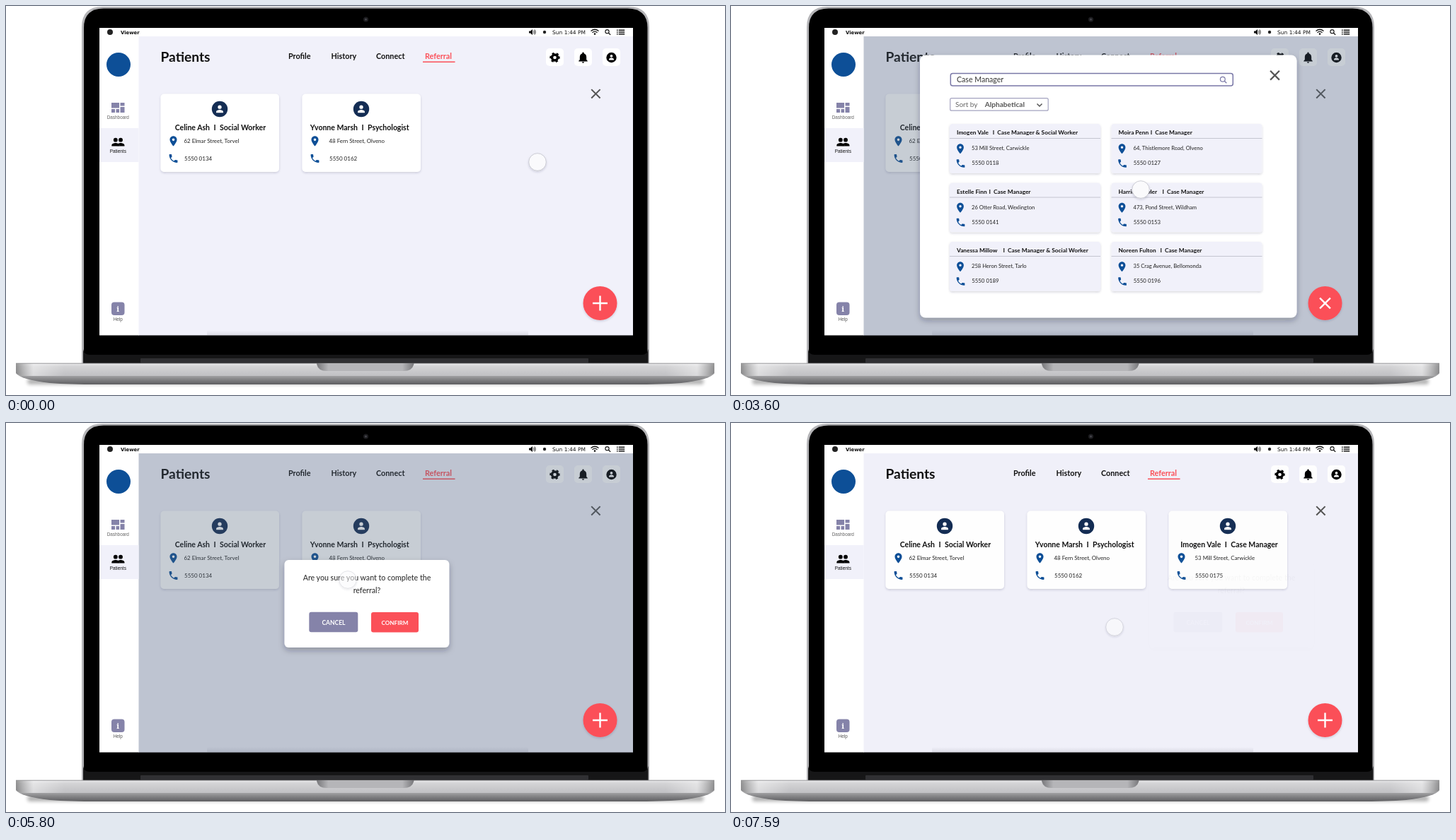
Animation, 1016 px wide and 551 px high, one loop 8.29 s. Source, as an HTML page:

```html
<!DOCTYPE html>
<html lang="en">
<head>
<meta charset="utf-8">
<title>Patient referral</title>
<style>
  html, body { margin: 0; width: 100%; height: 100%; overflow: hidden; background: #fff; }
  svg { display: block; width: 1016px; height: 551px; }
  text { font-family: Lato, "Open Sans", sans-serif; }
  .ui { font-family: "Liberation Sans", Arial, sans-serif; }
  .bar { font-family: "DejaVu Sans", Verdana, sans-serif; }
</style>
</head>
<body>
<svg id="stage" viewBox="0 0 1016 551"></svg>
<script>
const RED = '#fb5058', BLUE = '#0d4f97', NAVY = '#142d54', PURPLE = '#8583a9', PALE = '#f1f1fa';
const LOOP = 8290, STEP = 100;

const ICONS = {
  pin: 'M12 2C8.13 2 5 5.13 5 9c0 5.25 7 13 7 13s7-7.75 7-13c0-3.87-3.13-7-7-7zm0 9.5a2.5 2.5 0 0 1 0-5 2.5 2.5 0 0 1 0 5z',
  phone: 'M6.62 10.79c1.44 2.83 3.76 5.14 6.59 6.59l2.2-2.2c.27-.27.67-.36 1.02-.24 1.12.37 2.33.57 3.57.57.55 0 1 .45 1 1V20c0 .55-.45 1-1 1-9.39 0-17-7.61-17-17 0-.55.45-1 1-1h3.5c.55 0 1 .45 1 1 0 1.25.2 2.45.57 3.57.11.35.03.74-.25 1.02z',
  bell: 'M12 22c1.1 0 2-.9 2-2h-4c0 1.1.9 2 2 2zm6-6v-5c0-3.07-1.64-5.64-4.5-6.32V4c0-.83-.67-1.5-1.5-1.5s-1.5.67-1.5 1.5v.68C7.63 5.36 6 7.92 6 11v5l-2 2v1h16v-1z'
};

const rect = (x, y, w, h, fill, r = 0, more = '') =>
  `<rect x="${x}" y="${y}" width="${w}" height="${h}" rx="${r}" fill="${fill}" ${more}/>`;
const circle = (x, y, r, fill, more = '') => `<circle cx="${x}" cy="${y}" r="${r}" fill="${fill}" ${more}/>`;
const line = (d, color, width, more = '') =>
  `<path d="${d}" fill="none" stroke="${color}" stroke-width="${width}" ${more}/>`;
const text = (s, x, y, size, o = {}) =>
  `<text x="${x}" y="${y}" font-size="${size}" font-weight="${o.w || 400}" fill="${o.fill || '#111'}" ` +
  `text-anchor="${o.at || 'start'}" class="${o.c || ''}">${s.replace('&', '&amp;')}</text>`;
const icon = (name, x, y, scale, fill = BLUE) =>
  `<path d="${ICONS[name]}" fill="${fill}" transform="translate(${x} ${y}) scale(${scale}) translate(-12 -12)"/>`;
const cross = (x, y, r, color, width) =>
  line(`M${x - r} ${y - r}l${2 * r} ${2 * r}m0 ${-2 * r}l${-2 * r} ${2 * r}`, color, width);
const person = (x, y, s, fill) =>
  `<path transform="translate(${x} ${y}) scale(${s})" fill="${fill}" d="M0-6a2.8 2.8 0 0 1 0 5.6a2.8 2.8 0 0 1 0-5.6zM-5.2 5.2V4C-5.2 1.8-1.8.9 0 .9S5.2 1.8 5.2 4v1.2z"/>`;
const group = (id, body, more = '') => `<g id="${id}" ${more}>${body}</g>`;

function patientCard(x, sep, addrX, name, role, addr, phone) {
  return rect(x, 124.5, 167.5, 110.5, '#fff', 5, 'filter="url(#soft)"') +
    circle(x + 83.5, 146, 11.2, NAVY) + person(x + 83.5, 146.2, .95, '#fff') +
    text(name, sep - 7, 175.5, 10.5, {w: 700, at: 'end'}) +
    text('I', sep, 175.5, 10.5, {w: 700, at: 'middle'}) +
    text(role, sep + 7, 175.5, 10.5, {w: 700}) +
    icon('pin', x + 18, 191.5, .72) + text(addr, addrX, 194.2, 7.9, {fill: '#222'}) +
    icon('phone', x + 18, 216, .66) + text(phone, addrX + .5, 219.2, 8, {fill: '#222'});
}

function resultCard(x, y, sep, name, role, addr, phone) {
  return rect(x, y, 213, 70, PALE, 4, 'filter="url(#soft)"') +
    line(`M${x} ${y + 20.5}h213`, '#c4c5d0', 1) +
    text(name, x + 10, y + 15, 8.3, {w: 700}) +
    text('I', sep, y + 15, 8.3, {w: 700, at: 'middle'}) +
    text(role, sep + 5.3, y + 15, 8.3, {w: 700}) +
    icon('pin', x + 15, y + 35.3, .7) + text(addr, x + 31, y + 37.4, 7.6, {fill: '#222'}) +
    icon('phone', x + 15.5, y + 56, .65) + text(phone, x + 31.3, y + 58, 7.8, {fill: '#222'});
}

const defs = `<defs>
  <linearGradient id="metal" x2="0" y2="1"><stop offset="0" stop-color="#e9e9ea"/><stop offset=".25" stop-color="#d3d3d5"/><stop offset="1" stop-color="#c0c0c3"/></linearGradient>
  <linearGradient id="under" x2="0" y2="1"><stop offset="0" stop-color="#b9b9bb"/><stop offset=".5" stop-color="#89898b"/><stop offset="1" stop-color="#5e5e61"/></linearGradient>
  <linearGradient id="ends"><stop offset="0" stop-color="#555" stop-opacity=".55"/><stop offset=".025" stop-color="#fff" stop-opacity=".4"/><stop offset=".07" stop-color="#fff" stop-opacity="0"/><stop offset=".93" stop-color="#fff" stop-opacity="0"/><stop offset=".975" stop-color="#fff" stop-opacity=".4"/><stop offset="1" stop-color="#555" stop-opacity=".55"/></linearGradient>
  <linearGradient id="notch"><stop offset="0" stop-color="#77777a"/><stop offset=".12" stop-color="#b5b5b8"/><stop offset=".88" stop-color="#b5b5b8"/><stop offset="1" stop-color="#77777a"/></linearGradient>
  <linearGradient id="dock" x2="0" y2="1"><stop offset="0" stop-color="#667" stop-opacity="0"/><stop offset="1" stop-color="#667" stop-opacity=".16"/></linearGradient>
  <filter id="soft" x="-20%" y="-20%" width="140%" height="150%"><feDropShadow dx="0" dy="1.5" stdDeviation="1.8" flood-color="#334" flood-opacity=".18"/></filter>
  <filter id="deep" x="-20%" y="-20%" width="140%" height="150%"><feDropShadow dx="0" dy="4" stdDeviation="4.5" flood-color="#223" flood-opacity=".3"/></filter>
  <filter id="blur" x="-10%" y="-300%" width="120%" height="700%"><feGaussianBlur stdDeviation="2.5"/></filter>
  <clipPath id="screen"><rect x="132" y="31" width="754" height="435.5"/></clipPath>
</defs>`;

const laptop =
  rect(30, 528, 956, 8, '#000', 4, 'opacity=".3" filter="url(#blur)"') +
  `<path d="M107 508V30Q107 1 136 1H880Q909 1 909 30V508z" fill="#b4b4b7"/>` +
  `<path d="M110 508V31Q110 3.5 138 3.5H878Q906.5 3.5 906.5 31V508z" fill="#000"/>` +
  `<path d="M109 440V486Q110 494 118 494H899Q906 494 907.5 486V440V506H109z" fill="#161617"/>` +
  rect(190, 499, 633, 6.5, '#303033', 1) +
  circle(508.5, 19, 3.6, '#1d1d20') + circle(508.5, 19, 1.6, '#44444a') +
  `<path d="M14 520Q20 529 62 534Q90 536 130 536H886Q926 536 954 534Q996 529 1001 520z" fill="url(#under)"/>` +
  `<path d="M14 506H1001V520Q998 524 985 524H30Q17 524 14 520z" fill="url(#metal)"/>` +
  `<path d="M14 506H1001V520Q998 524 985 524H30Q17 524 14 520z" fill="url(#ends)"/>` +
  line('M14 506.2H1001', '#8d8d90', .9) +
  `<path d="M439 506H576.500Q575 517 562 517H453Q440 517 439 506z" fill="url(#notch)"/>`;

const menuBar = rect(132, 31, 754, 12, '#fff') +
  circle(147, 37, 4, '#222') +
  text('Viewer', 162, 39.8, 6.9, {w: 700, c: 'bar'}) +
  text('Sun 1:44 PM', 772, 39.8, 7.5, {c: 'bar'}) +
  `<path d="M739 35.500h2l3-2.500v8l-3-2.500h-2z" fill="#111"/>` +
  line('M745.5 35q1.500 2 0 4m1.500-5.500q2.500 3.500 0 7', '#111', .9) +
  circle(761, 37, 2.2, '#222') +
  line('M826.500 35.500q5.500-4.500 11 0m-9 2.200q3.500-3 7 0', '#111', 1.3) + circle(832, 39.6, 1.3, '#111') +
  circle(849.5, 36.2, 2.6, 'none', 'stroke="#111" stroke-width="1.1"') + line('M851.500 38.200l2.700 2.700', '#111', 1.3) +
  line('M863 34.200h1.500m1.200 0h8.500m-11.200 2.800h1.500m1.200 0h8.500m-11.200 2.800h1.500m1.200 0h8.500', '#111', 1.5);

const sidebar = rect(132, 43, 55.5, 424, '#fff') + rect(132, 173, 55.5, 48, PALE) +
  circle(159, 83, 17, BLUE) +
  rect(149, 137, 11, 7.5, PURPLE) + rect(149, 146, 5, 5, PURPLE) + rect(155.5, 146, 4.5, 5, PURPLE) +
  rect(161.5, 137, 6, 4.5, PURPLE) + rect(161.5, 143, 6, 8, PURPLE) +
  text('Dashboard', 158.3, 160, 6.4, {at: 'middle', fill: '#666', c: 'ui'}) +
  person(162, 193, 1.05, '#000') + person(154.5, 193, 1.1, PALE) + person(154.8, 193, 1.05, '#000') +
  text('Patients', 158.3, 207.5, 6.4, {at: 'middle', c: 'ui'}) +
  rect(149, 419.5, 18.5, 18.5, PURPLE, 4) +
  `<text x="158.300" y="432.500" font-size="11" font-weight="700" fill="#fff" text-anchor="middle" style="font-family:'Noto Serif',serif">i</text>` +
  text('Help', 158.3, 446, 6.4, {at: 'middle', fill: '#555', c: 'ui'});

const tabs = [['Profile', 399], ['History', 459.5], ['Connect', 523], ['Referral', 592]]
  .map(([s, x]) => text(s, x, 75, 10.8, {w: 700, fill: s === 'Referral' ? RED : '#111'})).join('');

const topIcons = [763, 803, 843].map(x => rect(x, 60, 25, 25, '#fff', 5)).join('') +
  circle(775.5, 73, 4, 'none', 'stroke="#000" stroke-width="3.400"') +
  circle(775.5, 73, 5.9, 'none', 'stroke="#000" stroke-width="2.600" stroke-dasharray="3.100 3.080" transform="rotate(-15 775.5 73)"') +
  icon('bell', 815.5, 73, .78, '#000') +
  circle(855.5, 73, 7.2, '#000') + person(855.5, 73, .68, '#fff');

const page = rect(187, 43, 699, 424, PALE) +
  text('Patients', 218.5, 78.5, 19.2, {w: 700}) + tabs + rect(589, 78.5, 45.5, 1.5, RED) + topIcons +
  cross(833.4, 124.3, 6.2, '#555', 2) + rect(284, 459, 454, 8, 'url(#dock)', 2) +
  patientCard(218.5, 295, 251.5, 'Celine Ash', 'Social Worker', '62 Elmar Street, Torvel', '5550 0134') +
  patientCard(418.5, 504, 456.5, 'Yvonne Marsh', 'Psychologist', '48 Fern Street, Olveno', '5550 0162') +
  group('newCard', patientCard(618.5, 699.3, 655.5, 'Imogen Vale', 'Case Manager', '53 Mill Street, Carwickle', '5550 0175'));

const CM = 'Case Manager', BOTH = 'Case Manager & Social Worker';
const results = [
  [309, 167, 371, 'Imogen Vale', BOTH, '53 Mill Street, Carwickle', '5550 0118'],
  [537.5, 167, 594, 'Moira Penn', CM, '64, Thistlemore Road, Olveno', '5550 0127'],
  [309, 250.5, 365.7, 'Estelle Finn', CM, '26 Otter Road, Wexlington', '5550 0141'],
  [537.5, 250.5, 610.7, 'Harriet Bowler', CM, '473, Pond Street, Wildham', '5550 0153'],
  [309, 334, 385.7, 'Vanessa Millow', BOTH, '258 Heron Street, Tarlo', '5550 0189'],
  [537.5, 334, 607.7, 'Noreen Fulton', CM, '35 Crag Avenue, Bellomonda', '5550 0196']
];

const modal = rect(267, 69.5, 532.5, 372, '#fff', 8, 'filter="url(#deep)"') +
  rect(310.3, 95.5, 399, 17.5, '#fff', 3, 'stroke="#7977a6" stroke-width="1.500"') +
  text(CM, 319, 108, 10.6, {fill: '#333'}) +
  circle(694.8, 103.8, 3.4, 'none', 'stroke="#7977a6" stroke-width="1.200"') + line('M697.300 106.300l3 3', '#7977a6', 1.3) +
  rect(309.7, 130.7, 138.5, 17.5, '#fff', 2, 'stroke="#a3a2bf" stroke-width="1.200"') +
  text('Sort by', 317, 143, 10, {fill: '#666'}) +
  text('Alphabetical', 358.8, 143, 10.1, {w: 700, fill: '#555'}) +
  line('M432.500 138.500l3.500 3.500l3.500-3.500', '#555', 1.5) +
  cross(768.5, 98.2, 6.4, '#555', 2.2) +
  results.map(r => resultCard(...r)).join('');

const dialog = rect(393.5, 194, 232.8, 124, '#fff', 6, 'filter="url(#deep)"') +
  text('Are you sure you want to complete the', 510, 222.5, 10.6, {w: 500, at: 'middle', fill: '#333'}) +
  text('referral?', 510, 240.5, 10.6, {w: 500, at: 'middle', fill: '#333'}) +
  rect(428.3, 267.7, 69, 28.5, PURPLE, 3) + rect(516, 268, 67, 28.5, RED, 3) +
  text('CANCEL', 463, 285.8, 8.5, {w: 700, at: 'middle', fill: '#fff'}) +
  text('CONFIRM', 549.5, 286.2, 8.1, {w: 700, at: 'middle', fill: '#fff'});

const button = circle(839.5, 421, 24, RED, 'filter="url(#soft)"') +
  group('plus', line('M829 421h21m-10.500-10.500v21', '#fff', 2.4));

document.getElementById('stage').innerHTML = defs + laptop +
  `<g clip-path="url(#screen)">` + page +
  group('shade', rect(187, 43, 699, 424, 'rgb(74,94,117)', 0, 'opacity=".310"')) +
  sidebar + menuBar + group('modal', modal) + group('dialog', dialog) + button +
  group('cursor', group('disc', circle(0, 0, 12.3, '#fafafc', 'stroke="#b9bac4" stroke-width=".700"'), 'filter="url(#soft)"')) + '</g>';

const el = id => document.getElementById(id);
const set = (id, name, value) => el(id).setAttribute(name, value);

// Each key is [time, ...values]; values ease between keys.
const PATH = [[0, 751, 221], [450, 751, 221], [1400, 838, 411], [1600, 838, 411], [2200, 839, 421],
  [2700, 839, 421], [3600, 579, 260], [3900, 548, 258], [4050, 548, 258], [4900, 483, 222],
  [5800, 483, 222], [6500, 542, 289], [LOOP, 542, 289]];
const DISC = [[0, 1], [1400, 1], [1500, .48], [2300, .48], [2600, 1], [5050, 1], [5150, .55], [5800, .55],
  [5900, 1], [6450, 1], [6550, .48], [7400, .48], [7600, 1], [LOOP, 1]];
const DONE = [[0, 0], [6700, 0], [6800, .09], [6900, .97], [7400, .97], [7600, 1], [LOOP, 1]];

function at(keys, t) {
  const i = keys.findIndex(k => k[0] > t), a = keys[i - 1], b = keys[i];
  const u = (t - a[0]) / (b[0] - a[0]), e = u * u * (3 - 2 * u);
  return a.slice(1).map((v, n) => v + (b[n + 1] - v) * e);
}

function draw(now) {
  const t = Math.floor(now % LOOP / STEP) * STEP;
  const [x, y] = at(PATH, t), [alpha] = at(DISC, t), [done] = at(DONE, t);
  const picking = t >= 2300 && t < 5100, asking = t >= 5100;
  set('cursor', 'transform', `translate(${x} ${y})`);
  set('disc', 'opacity', alpha);
  set('newCard', 'opacity', done);
  set('shade', 'opacity', t >= 2300 ? 1 - done : 0);
  set('modal', 'opacity', picking ? 1 : 0);
  set('dialog', 'opacity', asking ? 1 - done * done : 0);
  set('dialog', 'transform', `translate(${done * 200} 0)`);
  set('plus', 'transform', `rotate(${picking ? 45 : 0} 839.5 421)`);
  requestAnimationFrame(draw);
}
draw(performance.now());
</script>
</body>
</html>
```
